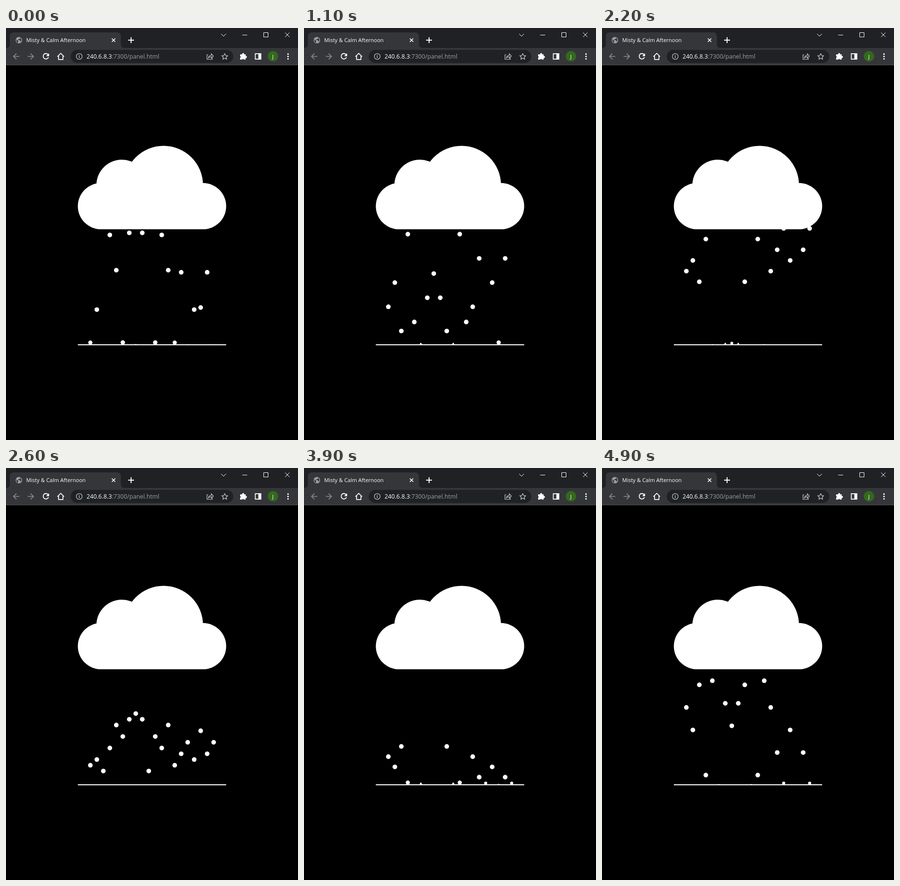
These frames come from a looping animation (600x848 px, 5000 ms). An HTML page:

```html
<!DOCTYPE html>
<html lang="en">
<head>
<meta charset="utf-8">
<title>Misty &amp; Calm Afternoon</title>
<style>
  html, body { margin: 0; width: 100%; height: 100%; overflow: hidden; background: #000; }
  svg { display: block; width: 100vw; height: 100vh; }
  text { font-family: "Open Sans", "Noto Sans", sans-serif; fill: #fff; }
  .line { fill: none; stroke: #fff; }
  .dim { stroke: #8a8b8f; }
  .soft { stroke: #c8c9cc; }
  .white { fill: #fff; }
</style>
</head>
<body>
<svg viewBox="0 0 600 848">
  <rect width="600" height="848"/>

  <!-- window frame and tab -->
  <rect width="600" height="41" fill="#202124"/>
  <path d="M0 41Q8 41 8 33V17Q8 9 16 9H228Q236 9 236 17V33Q236 41 244 41Z" fill="#35363a"/>
  <rect y="41" width="600" height="35" fill="#35363a"/>
  <rect y="75.5" width="600" height="1" fill="#57585c"/>

  <circle cx="26.5" cy="25" r="6.6" fill="#9aa0a6"/>
  <path d="M21.5 23.2L25 26.6V29.5L23.5 30Q20.8 28 21.5 23.2ZM26 19.8H29V21.8L27 23H25.2V25H28.5L29.6 27.5H31.2Q32.4 24 30.6 21.4L29 19.8Z" fill="#35363a"/>
  <text x="41.5" y="29" font-size="11">Misty &amp; Calm Afternoon</text>
  <path class="line" stroke-width="1.7" d="M217.5 21.5l7 7m0-7l-7 7"/>
  <path class="line" stroke-width="1.9" d="M251 25h12m-6-6v12"/>
  <path class="line" stroke-width="1" d="M442 12l5 5 5-5M485.5 14.5h10M529.5 9.5h9v9h-9zM573.5 9.5l9 9m0-9l-9 9"/>

  <!-- toolbar -->
  <path class="line dim" stroke-width="1.7" d="M27.5 58.5h-12m6-6l-6 6 6 6M44.5 58.5h12m-6-6l6 6-6 6"/>
  <path class="line" stroke-width="1.8" d="M86.4 54.6A5.6 5.6 0 1 0 87.3 60"/>
  <path class="white" d="M88.5 52v6h-6z"/>
  <path class="line" stroke-width="1.7" d="M105.5 59l7-6.8 7 6.8M108 57.5v7.3h9v-7.3"/>

  <rect x="133" y="45" width="334" height="27" rx="13.5" fill="#202124"/>
  <circle class="line soft" cx="150.5" cy="58.5" r="6" stroke-width="1.2"/>
  <path class="line soft" stroke-width="1.4" d="M150.5 57.5v4.2m0-6.6v1.4"/>
  <text x="165.5" y="63" font-size="12.3">240.6.8.3<tspan fill="#9aa0a6">:7300/panel.html</tspan></text>
  <path class="line soft" stroke-width="1.2" d="M415.5 55H413v9.5h11V62M416 61.5q.5-5 6-5.2v-3.2l4.2 4.6-4.2 4.5v-3.1q-4 0-6 2.4z"/>
  <path class="line soft" stroke-width="1.2" stroke-linejoin="round" d="M449.5 52.5l1.8 4.1 4.5.4-3.4 3 1 4.4-3.9-2.3-3.9 2.3 1-4.4-3.4-3 4.5-.4z"/>

  <path class="white" d="M482 54.2h3.4a2 2 0 1 1 3.8 0h3.3v3.5a2 2 0 1 1 0 3.8V65h-3.5a1.9 1.9 0 0 0-3.6 0H481v-3.7a1.9 1.9 0 0 0 0-3.6v-2.5q0-1 1-1z"/>
  <path class="line" stroke-width="1.7" d="M512.3 52.8h11.4v11.4h-11.4z"/>
  <rect class="white" x="518.5" y="52.5" width="5.5" height="12"/>
  <circle cx="548.5" cy="58.3" r="10.7" fill="#33691e"/>
  <text x="548.5" y="62.5" font-size="11.5" text-anchor="middle">J</text>
  <g class="white">
    <circle cx="579.5" cy="53.7" r="1.6"/>
    <circle cx="579.5" cy="58.6" r="1.6"/>
    <circle cx="579.5" cy="63.5" r="1.6"/>
  </g>

  <!-- scene -->
  <g class="white">
    <g id="rain"></g>
    <rect x="147.6" y="319" width="304.8" height="95.3" rx="47.65"/>
    <circle cx="238.1" cy="323.5" r="52.4"/>
    <circle cx="323.8" cy="323.5" r="81"/>
    <rect x="147.6" y="651" width="304.8" height="2"/>
  </g>
</svg>
<script>
  const LOOP = 5000, STEP = 100;
  const SYNC = 3067;            // moment when every drop starts together
  const FIRST = 33;             // the opening pose sits slightly ahead
  const TOP = 362, FALL = 285, RADIUS = 4.76, GAP = 13.335;
  const LAND = 0.75;            // share of a cycle spent falling
  const speeds = [11, 12, 10, 14, 18, 16, 19, 20, 19, 10,
                  16, 14, 18, 11, 13, 15, 12, 17, 13, 15];

  const rain = document.getElementById('rain');
  const drops = speeds.map((speed, i) => {
    const el = document.createElementNS('http://www.w3.org/2000/svg', 'circle');
    el.setAttribute('cx', 300 + (i - 9.5) * GAP);
    rain.append(el);
    return { el, speed };
  });

  function draw(ms) {
    const time = Math.max(FIRST, Math.floor(ms % LOOP / STEP) * STEP);
    for (const { el, speed } of drops) {
      const turns = (time - SYNC) * speed / 15000;
      const phase = turns - Math.floor(turns);
      const r = RADIUS * Math.min(1, (1 - phase) / (1 - LAND));
      const bottom = TOP + RADIUS + FALL * Math.min(1, phase / LAND);
      el.setAttribute('r', r);
      el.setAttribute('cy', bottom - r);
    }
  }

  let start;
  function tick(now) {
    start ??= now;
    draw(now - start);
    requestAnimationFrame(tick);
  }
  draw(0);
  requestAnimationFrame(tick);
</script>
</body>
</html>
```
